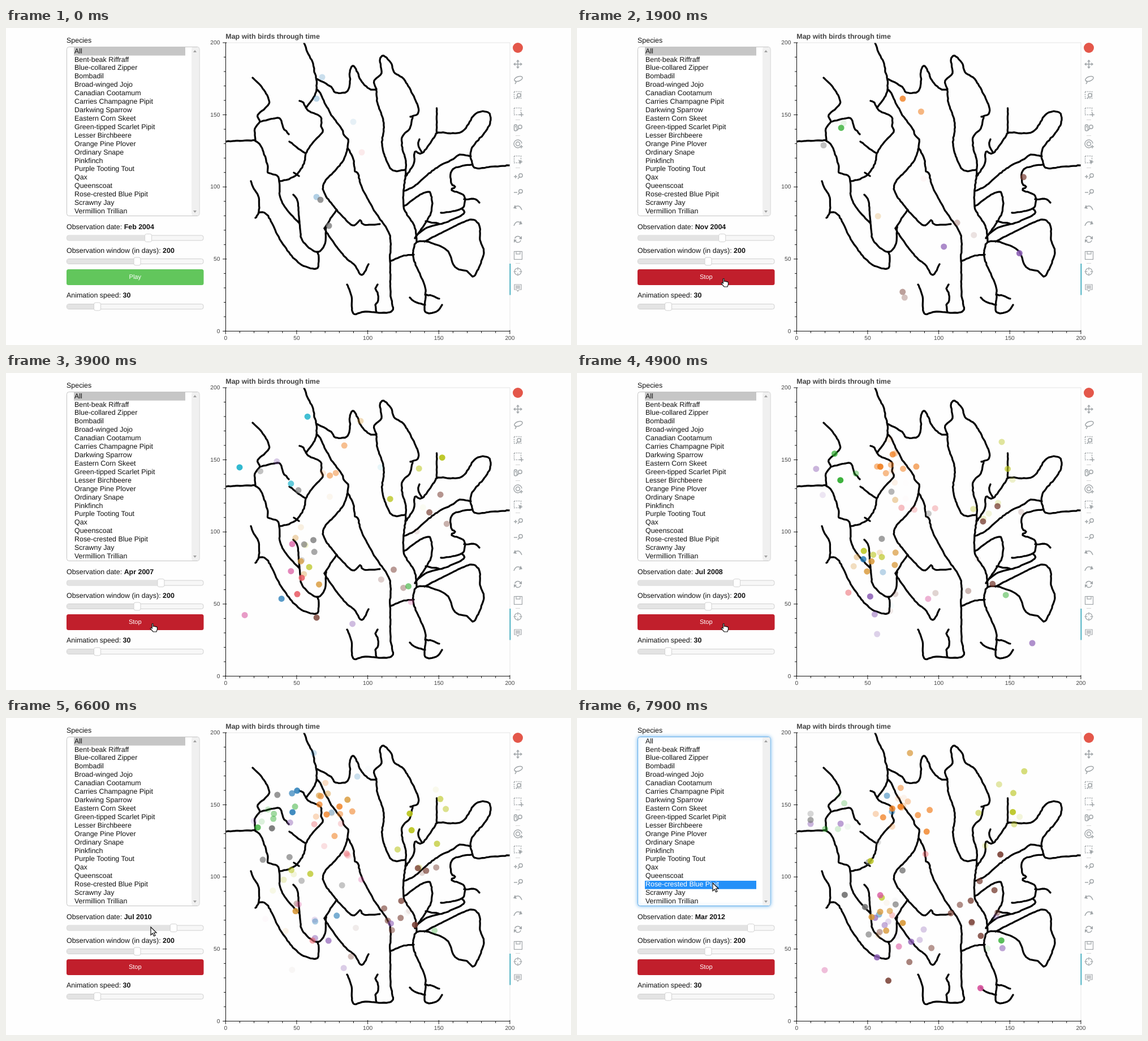
These frames come from a looping animation (999x561 px, 8000 ms). An HTML page with a canvas:

```html
<!DOCTYPE html>
<html lang="en">
<head>
<meta charset="utf-8">
<title>Map with birds through time</title>
<style>
html, body { margin: 0; width: 100%; height: 100%; overflow: hidden; background: #fefefe; }
canvas { display: block; }
</style>
</head>
<body>
<canvas id="stage" width="999" height="561"></canvas>
<script>
const c = document.getElementById('stage').getContext('2d');
const FONT = '"Liberation Sans", Arial, sans-serif', SIZE = 14 * 8 / 9, ICON = '#a1a6a9';
const LOOP = 8000, FADE_STEPS = 4.4, LAST_STEP = 66, MONTHS_PER_STEP = 1.4908;
const MONTHS = 'Jan Feb Mar Apr May Jun Jul Aug Sep Oct Nov Dec'.split(' ');
const SPECIES = ['All', 'Bent-beak Riffraff', 'Blue-collared Zipper', 'Bombadil', 'Broad-winged Jojo',
  'Canadian Cootamum', 'Carries Champagne Pipit', 'Darkwing Sparrow', 'Eastern Corn Skeet',
  'Green-tipped Scarlet Pipit', 'Lesser Birchbeere', 'Orange Pine Plover', 'Ordinary Snape', 'Pinkfinch',
  'Purple Tooting Tout', 'Qax', 'Queenscoat', 'Rose-crested Blue Pipit', 'Scrawny Jay', 'Vermillion Trillian'];

let seed = 7;
const random = () => (seed = seed * 16807 % 2147483647) / 2147483647;
const clamp = (v, low, high) => Math.min(high, Math.max(low, v));
const monthsAt = step => .15 + step * MONTHS_PER_STEP;

// ---- roads: a slightly rough curve through a few key points ----
const roads = new Path2D();
function road(...p) {
  const last = p.length / 2 - 1;
  const at = (i, axis) => p[2 * clamp(i, 0, last) + axis];
  const curve = (i, f, axis) => {
    const [a, b, d, e] = [-1, 0, 1, 2].map(k => at(i + k, axis));
    return b + f / 2 * (d - a + f * (2 * a - 5 * b + 4 * d - e + f * (3 * (b - d) + e - a)));
  };
  roads.moveTo(p[0], p[1]);
  for (let i = 0; i < last; i++) {
    const parts = Math.ceil(Math.hypot(at(i + 1, 0) - at(i, 0), at(i + 1, 1) - at(i, 1)) / 4);
    for (let n = 1; n <= parts; n++) {
      const rough = n < parts ? 1.1 : 0;
      roads.lineTo(curve(i, n / parts, 0) + (random() - .5) * rough, curve(i, n / parts, 1) + (random() - .5) * rough);
    }
  }
}
// north-west
road(527,24, 533,43, 543,63, 545,78, 548,85, 549,109, 542,126, 530,141);
road(549,110, 554,113, 573,150, 593,178, 598,190, 605,197, 604,212);
road(519,129, 526,132, 534,146, 556,157, 557,174, 560,184, 545,200, 530,222, 527,240, 511,262, 483,272);
road(501,201, 514,211, 530,222);
road(509,256, 518,262);
road(436,88, 452,104, 464,125, 463,137, 445,154, 449,166, 440,178, 441,200);
road(449,166, 475,160, 485,161, 490,176, 500,188);
road(388,201, 428,199, 441,200, 453,213, 463,247, 463,256, 479,261, 483,272, 485,300, 497,322, 519,346);
// south-west
road(508,295, 516,308, 519,346, 524,376, 548,396, 563,384, 566,350);
road(433,271, 437,282, 447,300, 447,325, 441,336);
road(447,327, 462,331, 488,380, 518,416, 548,426, 553,410, 551,396);
road(604,212, 594,238, 564,272, 563,292, 585,322, 612,349, 626,340, 633,348, 661,347);
road(585,322, 566,350, 566,360, 597,403, 615,418, 629,437, 641,418);
// centre and south
road(604,212, 614,232, 617,254, 622,257, 630,284, 653,326, 678,365, 679,413, 680,470, 681,502, 635,502, 614,505, 611,475, 603,454);
road(655,502, 653,490, 658,482, 657,468, 653,461, 657,454);
road(679,413, 700,404, 721,401);
// north
road(549,90, 575,104, 582,114, 602,113, 608,98, 608,78, 613,67, 619,73, 629,95, 645,109, 655,108);
road(655,108, 651,93, 664,80, 661,57, 668,49, 682,64, 686,78, 706,94, 728,137, 728,152, 715,157);
road(719,157, 714,178, 701,192, 701,215, 707,235, 706,262);
road(655,108, 657,133, 668,168, 665,205, 672,233, 684,252, 705,251);
// east
road(707,262, 721,240, 723,219, 736,221, 757,194, 764,185, 805,184, 830,152, 852,149, 857,163, 848,183, 823,214, 824,238,
  832,248, 865,245, 891,243);
road(736,221, 729,207, 731,197);
road(761.5, 186, 761.5, 142);
road(822,227, 802,224, 791,232, 768,243, 745,260, 722,280, 705,288);
road(825,241, 790,250, 787,274, 794,281, 788,287, 810,297, 808,318, 787,325, 769,327);
road(810,303, 830,303, 837,309);
road(706,262, 703,316, 722,350, 726,378);
road(703,316, 738,292, 751,294, 751,328, 723,372);
road(725,368, 745,353, 778,344, 809,329, 807,321);
road(742,342, 765,346);
road(740,378, 785,355, 822,339, 837,350, 838,375, 845,398, 832,432, 825,440, 815,430, 794,423, 779,393, 745,378, 726,379,
  721,390, 721,410, 739,452, 742,473, 741,502, 761,502, 771,490);
road(741,472, 754,474, 766,479);
road(714,477, 722,484, 741,490);

// ---- birds: every flock keeps to its haunt; a sighting appears at once and fades away ----
const BLUE = '#1f77b4', GRAY = '#757575', ORANGE = '#f08022', GOLD = '#d99a3c', OLIVE = '#b9c41c', GREEN = '#2eac2e',
  CYAN = '#22b4cc', PURPLE = '#8a5cb4', PINK = '#d8549e', SALMON = '#ea6068', BROWN = '#7a4136';
const birds = [], flocks = [];
const bird = (colour, x, y, born) => birds.push({ colour, x, y, born });
function flock(colour, share, x, y, spread) {
  while (share--) flocks.push({ colour, x, y, spread });
}
bird(BLUE, 559, 87, -3.3);
bird(BLUE, 549, 125, -3);
bird(BLUE, 614, 166, -3.9);
bird(BLUE, 549, 299, -2.8);
bird(SALMON, 629, 220, -3.8);
bird(GRAY, 556, 304, -.8);
bird(GRAY, 571, 350, -.8);

flock(ORANGE, 9, 572, 158, 28);
flock(GOLD, 3, 565, 145, 50);
flock(GOLD, 4, 535, 340, 30);
flock(OLIVE, 4, 755, 143, 30);
flock(OLIVE, 3, 715, 236, 25);
flock(OLIVE, 4, 515, 318, 30);
flock(BLUE, 2, 540, 115, 50);
flock(BLUE, 3, 525, 340, 50);
flock(CYAN, 2, 565, 260, 100);
flock(GREEN, 3, 473, 170, 25);
flock(GREEN, 1, 730, 400, 30);
flock(PURPLE, 5, 580, 400, 35);
flock(PURPLE, 2, 465, 185, 30);
flock(PURPLE, 1, 745, 360, 70);
flock(PINK, 3, 555, 360, 80);
flock(SALMON, 5, 600, 215, 28);
flock(SALMON, 1, 520, 368, 20);
flock(BROWN, 6, 699, 348, 22);
flock(BROWN, 5, 742, 250, 28);
flock(BROWN, 5, 570, 420, 45);
flock(GRAY, 6, 545, 300, 45);
flock(GRAY, 3, 500, 240, 50);

const around = (centre, spread) => centre + (random() + random() + random() - 1.5) * 1.8 * spread;
for (let step = .5; step < LAST_STEP; step += .5) {
  const season = 1 + .3 * Math.cos((monthsAt(step) - 2) * Math.PI / 6);
  const count = Math.floor((2 + .3 * step) * season / 2 + random());
  for (let n = 0; n < count; n++) {
    const f = flocks[Math.floor(random() * flocks.length)];
    bird(f.colour, clamp(around(f.x, f.spread), 413, 805), clamp(around(f.y, f.spread), 62, 478), step - random() / 2);
  }
}

// ---- drawing helpers ----
function text(str, x, y, { size = SIZE, colour = '#111', align = 'left', weight = '' } = {}) {
  c.font = `${weight} ${size}px ${FONT}`;
  c.textRendering = 'geometricPrecision';
  c.fillStyle = colour;
  c.textAlign = align;
  c.fillText(str, x, y);
  return c.measureText(str).width;
}
function box(x, y, w, h, r, fill, stroke) {
  c.beginPath();
  c.roundRect(x, y, w, h, r);
  if (fill) { c.fillStyle = fill; c.fill(); }
  if (stroke) { c.strokeStyle = stroke; c.lineWidth = 1; c.stroke(); }
}
function line(...p) {
  c.beginPath();
  for (let i = 0; i < p.length; i += 2) c.lineTo(p[i], p[i + 1]);
  c.stroke();
}
function disc(x, y, r, fill) {
  c.beginPath();
  c.arc(x, y, r, 0, 2 * Math.PI);
  c.fillStyle = fill;
  c.fill();
}
function ring(x, y, r, from = 0, to = 2 * Math.PI) {
  c.beginPath();
  c.arc(x, y, r, from, to);
  c.stroke();
}
function polygon(fill, ...p) {
  c.beginPath();
  for (let i = 0; i < p.length; i += 2) c.lineTo(p[i], p[i + 1]);
  c.fillStyle = fill;
  c.fill();
}

// ---- controls ----
function labelled(label, value, y) {
  const width = text(label + ' ', 107, y);
  text(value, 107 + width, y, { weight: 'bold' });
}
function slider(x, y) {
  box(107.5, y - 4.5, 241.5, 9, 3.5, '#f7f7f7', '#d0d0d0');
  box(108, y - 4, x - 108, 8, 3, '#e3e3e3');
  box(x - 6, y - 7, 12, 14, 3, '#fff', '#d2d2d2');
}
function list(focused) {
  if (focused) { c.shadowColor = 'rgba(82,168,236,.8)'; c.shadowBlur = 6; }
  box(107.5, 33.5, 234.5, 299, 4, '#fff', focused ? '#66afe9' : '#c4c4c4');
  c.shadowBlur = 0;
  box(328, 34, 13.5, 298, 3, '#f0f0f0');
  polygon('#a0a0a0', 331, 43, 337, 43, 334, 39);
  polygon('#a0a0a0', 331, 323, 337, 323, 334, 327);
  const picked = focused ? 17 : 0;
  box(120, 34 + picked * 14.94, 197, 14.8, 0, focused ? '#2490f8' : '#c6c6c6');
  SPECIES.forEach((name, i) =>
    text(name, 121, 44.6 + i * 14.92, { colour: focused && i === picked ? '#fff' : '#111' }));
}

function plot(step) {
  text('Map with birds through time', 388.3, 18.7, { colour: '#444', weight: 'bold' });
  c.save();
  c.beginPath();
  c.rect(388, 26, 503, 511);
  c.clip();
  c.strokeStyle = '#050505';
  c.lineWidth = 3.3;
  c.lineJoin = c.lineCap = 'round';
  c.stroke(roads);
  for (const b of birds) {
    const alpha = 1 - (step - b.born) / FADE_STEPS;
    if (step < b.born || alpha <= 0) continue;
    c.globalAlpha = alpha * .93;
    disc(b.x, b.y, 5.5, b.colour);
  }
  c.restore();
  c.strokeStyle = '#e5e5e5';
  c.lineWidth = 1;
  c.strokeRect(388.5, 26, 502.5, 510.5);
  c.strokeStyle = '#111';
  line(388.5, 26, 388.5, 537);
  line(388, 536.5, 891, 536.5);
  for (let v = 0; v <= 200; v += 10) {
    const x = 388.3 + v * 2.513, y = 536.5 - v * 2.5525, major = v % 50 === 0;
    const out = major ? 5.3 : 3.5, inner = major ? 1.8 : 0;
    line(x, 536.5 - inner, x, 536.5 + out);
    line(388.5 - out, y, 388.5 + inner, y);
    if (major) {
      text(v, x, 552.3, { size: 10.2, colour: '#444', align: 'center' });
      text(v, 378.3, y + 3.2, { size: 10.2, colour: '#444', align: 'right' });
    }
  }
}

// ---- toolbar ----
function lens(x, y) { ring(x, y, 3.2); line(x - 2, y + 2.5, x - 5, y + 6); }
function dashedBox(y) {
  c.setLineDash([2, 1.8]);
  c.strokeRect(898.5, y - 6.5, 12, 12);
  c.setLineDash([]);
}
function plus(x, y, r) { line(x - r, y, x + r, y); line(x, y - r, x, y + r); }
function curvedArrow(y, dir) {
  const at = x => 905 + dir * x;
  c.beginPath();
  c.moveTo(at(-6), y - 1);
  c.quadraticCurveTo(at(3), y - 7, at(7), y + 4);
  c.stroke();
  polygon(ICON, at(-8), y + 1, at(-5), y - 5, at(-2), y + 2);
}
function quarters(y, drawPart) {
  for (let i = 0; i < 4; i++) {
    c.save();
    c.translate(905, y);
    c.rotate(i * Math.PI / 2);
    drawPart();
    c.restore();
  }
}
function toolbar() {
  disc(905, 35, 9, '#e4574a');
  c.strokeStyle = '#d4d4d4';
  c.lineWidth = 1;
  for (const y of [162.5, 190.5, 247.5, 416.5]) line(901, y, 909, y);
  c.strokeStyle = ICON;
  c.lineWidth = 1.5;
  plus(905, 64, 6);
  quarters(64, () => polygon(ICON, 8, 0, 4.5, -3, 4.5, 3));
  c.beginPath();
  c.ellipse(906, 90, 7.5, 4, -.35, 0, 7);
  c.stroke();
  line(900, 93, 902, 96, 900, 99);
  dashedBox(119);
  lens(907, 119);
  dashedBox(148);
  plus(911.5, 153.5, 3.5);
  c.beginPath();
  c.roundRect(898.5, 171, 5, 11, 2.5);
  c.stroke();
  line(901, 173, 901, 176);
  lens(909, 175);
  ring(905, 205, 7, .9, 6.2);
  ring(905, 205, 3.5);
  plus(911, 210, 3);
  dashedBox(233);
  polygon(ICON, 906, 233, 914, 237, 910, 238, 909, 242);
  plus(901, 263, 3);
  lens(910, 261);
  line(898, 291, 904, 291);
  lens(910, 289);
  curvedArrow(318, 1);
  curvedArrow(346, -1);
  ring(905, 374, 5.5, .3, 2.8);
  ring(905, 374, 5.5, 3.4, 5.9);
  polygon(ICON, 912, 368, 912, 374, 907, 373);
  polygon(ICON, 898, 380, 898, 374, 903, 375);
  c.lineWidth = 1.2;
  c.strokeRect(898.5, 395.5, 14, 14);
  c.strokeRect(902, 395.5, 7, 4.5);
  ring(905, 431, 6);
  quarters(431, () => line(2.5, 0, 7.5, 0));
  line(899, 454, 911, 454, 911, 463, 907, 463, 905, 466, 903, 463, 899, 463, 899, 453.5);
  for (const y of [456.5, 458.5, 460.5]) line(901, y, 909, y);
  c.fillStyle = '#35a9bd';
  c.fillRect(890.5, 417, 1.7, 55.5);
}

// ---- pointer: time, x, y ----
const TRACK = [[600, 256, 545], [800, 256, 474], [900, 256, 474], [1200, 256, 443], [6200, 256, 443], [6600, 256, 370],
  [7200, 240, 292], [LOOP, 240, 292]];
const ARROW = new Path2D('M0 0V14L3.2 11L5.6 16L8 15L5.6 10H10Z');
const HAND = new Path2D('M2.2 1Q3.2 0 4.2 1V5.5Q5.5 4.6 6.6 5.7Q8 5 9 6.3Q10.6 5.8 11.4 7.2V11L10 15H4.2L-.8 9.3Q-.7 7.6 1 8L2.2 9Z');
function pointerAt(t) {
  const i = TRACK.findIndex(key => key[0] > t);
  if (i < 1) return null;
  const [a, b] = [TRACK[i - 1], TRACK[i]], f = (t - a[0]) / (b[0] - a[0]);
  return { x: a[1] + (b[1] - a[1]) * f, y: a[2] + (b[2] - a[2]) * f };
}
function pointer({ x, y }, shape) {
  c.save();
  c.translate(x, y);
  c.fillStyle = '#fff';
  c.strokeStyle = '#111';
  c.lineWidth = 1.2;
  c.fill(shape);
  c.stroke(shape);
  c.restore();
}

function draw(now) {
  const t = Math.floor(now % LOOP / 100) * 100;
  const playing = t >= 1400;
  const step = playing ? (t - 1300) / 100 - (t >= 5700 ? 1 : 0) : 0;
  const elapsed = monthsAt(step), month = Math.floor(elapsed) + 1;
  const mouse = pointerAt(t), hover = mouse && mouse.y > 427 && mouse.y < 455;
  c.fillStyle = '#fefefe';
  c.fillRect(0, 0, 999, 561);
  text('Species', 107, 25.5);
  list(t >= 7700);
  labelled('Observation date:', MONTHS[month % 12] + ' ' + (2004 + Math.floor(month / 12)), 356);
  slider(251.5 + elapsed * .577, 371.5);
  labelled('Observation window (in days):', '200', 398.4);
  slider(232, 413);
  box(107, 427, 242.5, 28, 3.5, playing ? '#c11f2c' : hover ? '#4fae48' : '#62c65c');
  text(playing ? 'Stop' : 'Play', 228.3, 444.3, { size: 11.1, colour: '#fff', align: 'center' });
  labelled('Animation speed:', '30', 477.3);
  slider(161.5, 493);
  plot(step);
  toolbar();
  if (mouse) pointer(mouse, hover ? HAND : ARROW);
}

let start;
function tick(now) {
  start ??= now;
  draw(Math.max(0, now - start));
  requestAnimationFrame(tick);
}
requestAnimationFrame(tick);
</script>
</body>
</html>
```
